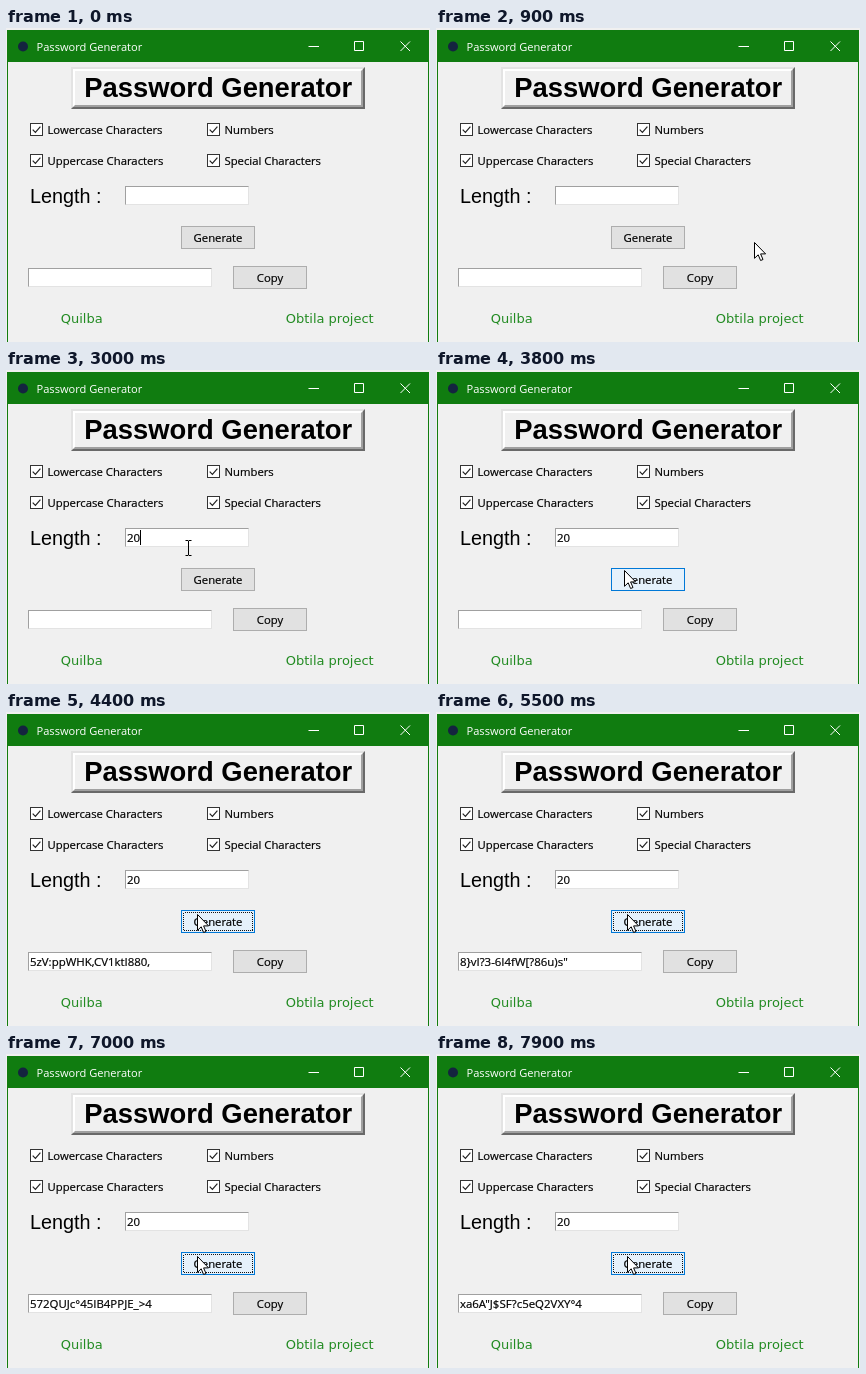
These frames come from a looping animation (424 px wide and 314 px high, 8000 ms). An HTML page:

```html
<!DOCTYPE html>
<html lang="en">
<head>
<meta charset="utf-8">
<title>Password Generator</title>
<style>
  html, body { margin: 0; width: 100%; height: 100%; overflow: hidden; background: #f0f0f0; }
  svg { display: block; width: 424px; height: 314px; }
  text { white-space: pre; }
  .ui { font: 11.3px "Open Sans", "Noto Sans", sans-serif; stroke: #000; stroke-width: .2px; }
  .caption { font: 11.1px "Open Sans", "Noto Sans", sans-serif; fill: #fff; }
  .field { font: 11.45px "Open Sans", "Noto Sans", sans-serif; stroke: #000; stroke-width: .2px; }
  .mid { text-anchor: middle; }
  .title { font: bold 27.4px "Liberation Sans", Arial, sans-serif; }
  .label { font: 19.8px "Liberation Sans", Arial, sans-serif; }
  .link { font: 13px "DejaVu Sans", Verdana, sans-serif; fill: #228b22; }
  .line { fill: none; stroke: #fff; }
  rect { shape-rendering: crispEdges; }
</style>
</head>
<body>
<svg id="stage" viewBox="0 0 424 314" xmlns="http://www.w3.org/2000/svg"></svg>
<script>
const NS = "http://www.w3.org/2000/svg";
const stage = document.getElementById("stage");
const LOOP = 8000, TICK = 100;

function add(tag, attrs, content = "") {
  const el = document.createElementNS(NS, tag);
  for (const key in attrs) el.setAttribute(key, attrs[key]);
  el.textContent = content;
  return stage.appendChild(el);
}
const box = (x, y, width, height, fill) => add("rect", { x, y, width, height, fill });
const label = (x, y, cls, content) => add("text", { x, y, class: cls }, content);
const frame = (x, y, w, h, fill, stroke) =>
  add("rect", { x: x + .5, y: y + .5, width: w - 1, height: h - 1, fill, stroke });
const show = (el, on) => el.setAttribute("visibility", on ? "visible" : "hidden");

// Bevel with separate top-left and bottom-right colours
function bevel(x, y, w, h, d, light, dark) {
  box(x, y, w, h, dark);
  add("path", { d: `M${x} ${y}h${w}l${-d} ${d}H${x + d}V${y + h - d}l${-d} ${d}z`, fill: light });
}

function entry(x, y, w, h) {
  bevel(x, y, w, h, 1, "#a0a0a0", "#e3e3e3");
  box(x + 1, y + 1, w - 2, h - 2, "#fff");
  return label(x + 1.9, y + 13.7, "field", "");
}

function check(x, y, name) {
  frame(x, y, 13, 13, "#fff", "#333");
  add("path", { d: `M${x + 2.7} ${y + 6.6}l2.7 2.8 5-5.8`, fill: "none", stroke: "#222", "stroke-width": 1.2 });
  label(x + 17.5, y + 11, "ui", name);
}

function button(x, y, name) {
  const face = frame(x, y, 74, 23, "#e1e1e1", "#adadad");
  label(x + 37, y + 16, "ui mid", name);
  return face;
}

// Window
box(0, 0, 424, 314, "#f0f0f0");
box(1, 2, 422, 32, "#107c10");
box(1, 34, 1, 280, "#107c10");
box(422, 34, 1, 280, "#107c10");
add("circle", { cx: 17, cy: 18.5, r: 5, fill: "#14243f" });
label(30.5, 23, "caption", "Password Generator");
add("path", { class: "line", d: "M302.5 18.5h10.5M348.5 13.5h9v9h-9z" });
add("path", { class: "line", d: "M394.5 13.5l9.5 9.5m0-9.5l-9.5 9.5" });

// Heading
bevel(65, 39, 294, 42, 2, "#e3e3e3", "#696969");
bevel(67, 41, 290, 38, 2, "#fff", "#a0a0a0");
box(69, 43, 286, 34, "#f0f0f0");
label(212.3, 69, "title mid", "Password Generator");

// Form
check(24, 95, "Lowercase Characters");
check(201, 95, "Numbers");
check(24, 126, "Uppercase Characters");
check(201, 126, "Special Characters");
label(24, 175, "label", "Length :");
const lengthText = entry(119, 158, 124, 19);
const caret = box(121, 160, 1, 15, "#000");
const generate = button(175, 198, "Generate");
const focus = add("rect", {
  x: 177.5, y: 200.5, width: 69, height: 18, fill: "none",
  stroke: "#111", "stroke-dasharray": "1 1", "stroke-dashoffset": 1
});
const output = entry(22, 240, 184, 19);
button(227, 238, "Copy");
label(54.7, 295, "link", "Quilba");
label(279.7, 295, "link", "Obtila project");

// Pointers, both with the hotspot at 0,0
const arrow = add("path", {
  d: "M.5 .5V16.3L4.2 12.8 6.6 18.5 9 17.5 6.6 11.9H11.6Z", fill: "#fff", stroke: "#000"
});
const beam = add("path", {
  d: "M-3-7.5h2.5l.5.5.5-.5H3M0-7V7M-3 7.5h2.5l.5-.5.5.5H3", fill: "none", stroke: "#000"
});

// time, x, y
const path = [
  [900, 318, 214], [1000, 285, 196], [1100, 250, 188], [1200, 212, 182],
  [1300, 186, 179], [1400, 179.5, 180], [1600, 179.5, 180], [1700, 182.5, 178],
  [3500, 182.5, 178], [3700, 188, 200], [3900, 188, 200], [4100, 191, 202], [8000, 191, 202]
];
const digits = [[0, ""], [2500, "2"], [2900, "20"]];
const carets = [[0, 0], [2100, 1], [3200, 0]];
const words = [
  [0, ""], [4300, "5zV:ppWHK,CV1ktI880,"], [4800, "r7K&d2:Tq9mW(x4Lb]e1"],
  [5300, "8}vI?3-6I4fW[?86u)s\""], [5800, "Hn3_w;Z6pY+k0R>a5cJ2"],
  [6300, "t4M'9eG<x1Vb8)Ls7uQ!"], [6800, "572QUJc°45IB4PPJE_>4"],
  [7300, "D6,yf8N[z3?hK5Ao=2vP"], [7700, "xa6A\"J$SF?c5eQ2VXY°4"]
];

const latest = (steps, t) => steps.filter(s => s[0] <= t).pop();

function pointAt(t) {
  const i = Math.max(1, path.findIndex(p => p[0] > t));
  const [a, b] = [path[i - 1], path[i]];
  const k = (t - a[0]) / (b[0] - a[0]);
  return [a[1] + (b[1] - a[1]) * k, a[2] + (b[2] - a[2]) * k];
}

function render(t) {
  const typed = latest(digits, t)[1];
  lengthText.textContent = typed;
  caret.setAttribute("x", 121 + Math.round(typed.length * 6.7));
  show(caret, latest(carets, t)[1]);
  output.textContent = latest(words, t)[1];

  const [x, y] = pointAt(t);
  const onEntry = t >= 1300 && t <= 3500;
  for (const p of [arrow, beam]) p.setAttribute("transform", `translate(${x} ${y})`);
  show(beam, onEntry);
  show(arrow, t >= 900 && !onEntry);

  // The button is held down for one tick before each new password
  const pressed = words.some(w => w[0] && w[0] - TICK === t);
  const hover = t >= 3700;
  generate.setAttribute("fill", pressed ? "#cce4f7" : hover ? "#e5f1fb" : "#e1e1e1");
  generate.setAttribute("stroke", pressed ? "#005499" : hover ? "#0078d7" : "#adadad");
  show(focus, t >= 4200);
}

const start = performance.now();
function loop() {
  const t = (performance.now() - start) % LOOP;
  render(Math.floor(t / TICK) * TICK);
  requestAnimationFrame(loop);
}
loop();
</script>
</body>
</html>
```
